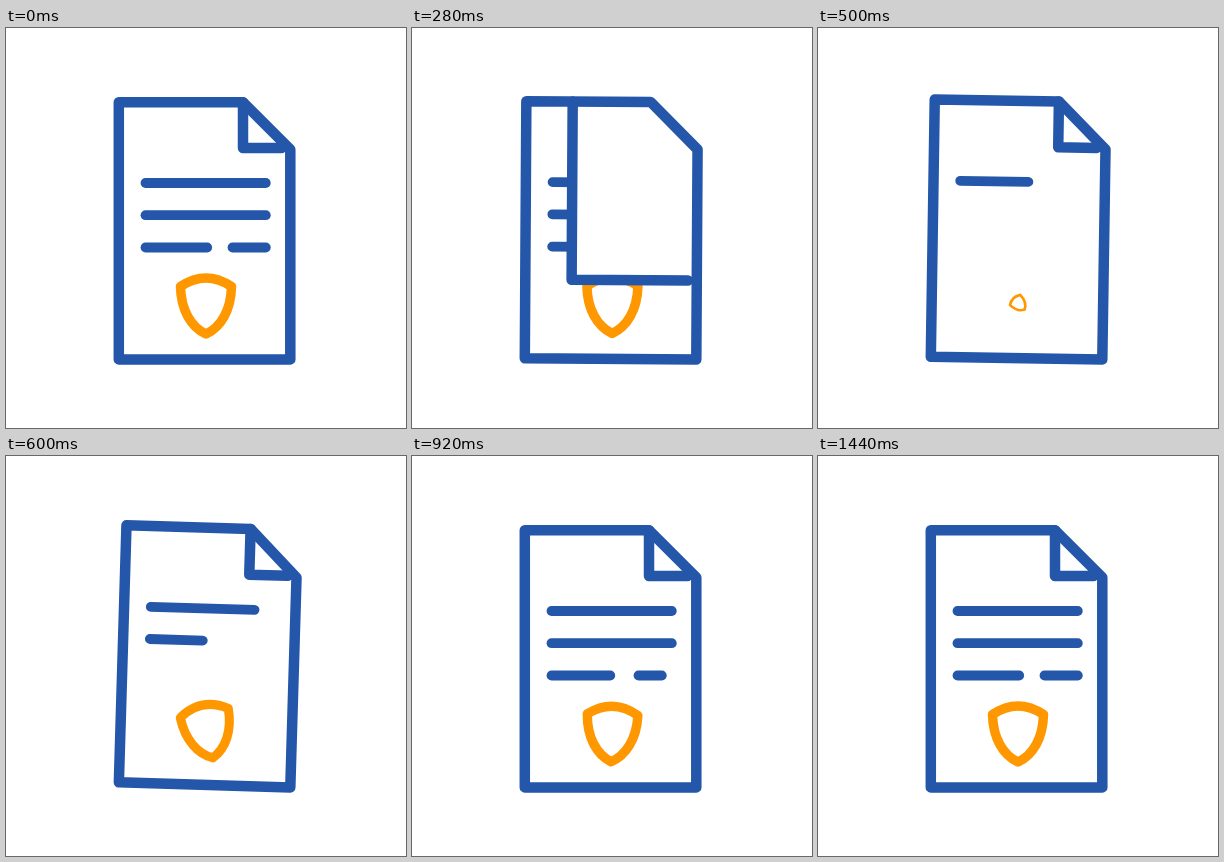
Write an HTML page with a canvas that moves like this. It is 400 by 400 pixels and loops after 2.63 s.

```html
<!DOCTYPE html>
<html lang="en">
<head>
<meta charset="utf-8">
<title>Document page turn</title>
<style>
  html, body { margin: 0; width: 100%; height: 100%; overflow: hidden; background: #fff; }
  canvas { display: block; }
</style>
</head>
<body>
<canvas id="stage" width="400" height="400"></canvas>
<script>
const ctx = document.getElementById('stage').getContext('2d');
const LOOP = 2630, BLUE = '#2456a9', ORANGE = '#ff9800';
const L = 112.8, T = 74.2, R = 284.3, B = 331.4;   // page edges
const CUT_X = 237, CUT_Y = 121.5;                  // clipped corner
const FOLD = { x: 237, y: 120 }, FOLD_END = 275.5;
const TURN_END = 480;

const TILT = [[0, 0], [160, 6.7], [360, -3], [560, 1.9], [760, 0]];
// x1, x2, y, time at which the line starts to grow
const LINES = [
  [139.5, 259.8, 155, 400],
  [139.5, 259.8, 187.2, 528],
  [139.5, 201.2, 219.5, 656],
  [226.5, 259.8, 219.5, 784]
];
const SHIELD = new Path2D('M174.5 258.5Q200 241.5 225.5 258.5C225 282 215 299 200 306C185 299 175 282 174.5 258.5Z');

const clamp = v => Math.min(1, Math.max(0, v));
const mix = (a, b, k) => a + (b - a) * k;
const smooth = p => (p = clamp(p), p * p * (3 - 2 * p));
const cubicOut = p => 1 - (1 - clamp(p)) ** 3;

function keyed(keys, t) {
  const i = keys.findIndex(k => k[0] > t);
  if (i < 0) return keys[keys.length - 1][1];
  const [t0, a] = keys[i - 1], [t1, b] = keys[i];
  return mix(a, b, smooth((t - t0) / (t1 - t0)));
}

function trace(points, closed) {
  ctx.beginPath();
  points.forEach(p => ctx.lineTo(...p));
  if (closed) ctx.closePath();
}

function stroke(points, width, closed) {
  trace(points, closed);
  ctx.strokeStyle = BLUE;
  ctx.lineWidth = width;
  ctx.stroke();
}

function drawShield(scale, degrees) {
  if (scale <= 0) return;
  ctx.save();
  ctx.translate(200, 277);
  ctx.rotate(degrees * Math.PI / 180);
  ctx.scale(scale, scale);
  ctx.translate(-200, -277);
  ctx.strokeStyle = ORANGE;
  ctx.lineWidth = 9.5;
  ctx.stroke(SHIELD);
  ctx.restore();
}

function drawLines(t) {
  for (const [x1, x2, y, start] of LINES) {
    const k = cubicOut((t - start) / 415);
    if (k > 0) stroke([[x1, y], [mix(x1, x2, k), y]], 9.8);
  }
}

// Springy pop with a decaying wobble
function popShield(t) {
  const p = (t - 460) / 1200;
  if (p <= 0) return;
  const rest = clamp((1440 - t) / 340);
  const bounce = 2 ** (-10 * p) * Math.sin((p - 0.125) * 4 * Math.PI);
  const wobble = 17.3 * Math.exp(-0.0038 * (t - 760)) * Math.sin((t - 640) * Math.PI / 300);
  drawShield(1 + bounce * rest, wobble * rest);
}

// The old sheet, covered by the growing flap
function drawTurn(t) {
  drawLines(LOOP);
  drawShield(1, 0);
  const k = smooth(t / TURN_END);
  const x = mix(FOLD.x, L, k), y = mix(FOLD.y, B, k);
  trace([[x, T], [CUT_X, T], [R, CUT_Y], [R, y], [x, y]], true);
  ctx.fillStyle = '#fff';
  ctx.fill();
  stroke([[x, T], [x, y], [FOLD_END, y]], 10.5);
}

function drawNewFold(t) {
  const k = smooth((t - 350) / 130);
  if (k <= 0) return;
  const corner = [[FOLD.x, T], [FOLD.x, FOLD.y], [FOLD_END, FOLD.y]];
  stroke(corner.map(([x, y]) => [mix(251, x, k), mix(93, y, k)]), 10.5);
}

function draw(t) {
  ctx.setTransform(1, 0, 0, 1, 0, 0);
  ctx.fillStyle = '#fff';
  ctx.fillRect(0, 0, 400, 400);
  ctx.lineCap = ctx.lineJoin = 'round';

  // The page rocks on its lower right corner
  ctx.translate(R, B);
  ctx.rotate(keyed(TILT, t) * Math.PI / 180);
  ctx.translate(-R, -B);

  if (t < TURN_END) drawTurn(t);
  drawNewFold(t);
  drawLines(t);
  popShield(t);
  stroke([[L, T], [CUT_X, T], [R, CUT_Y], [R, B], [L, B]], 10.5, true);
}

const begin = performance.now();
function tick() {
  draw((performance.now() - begin) % LOOP);
  requestAnimationFrame(tick);
}
tick();
</script>
</body>
</html>
```
